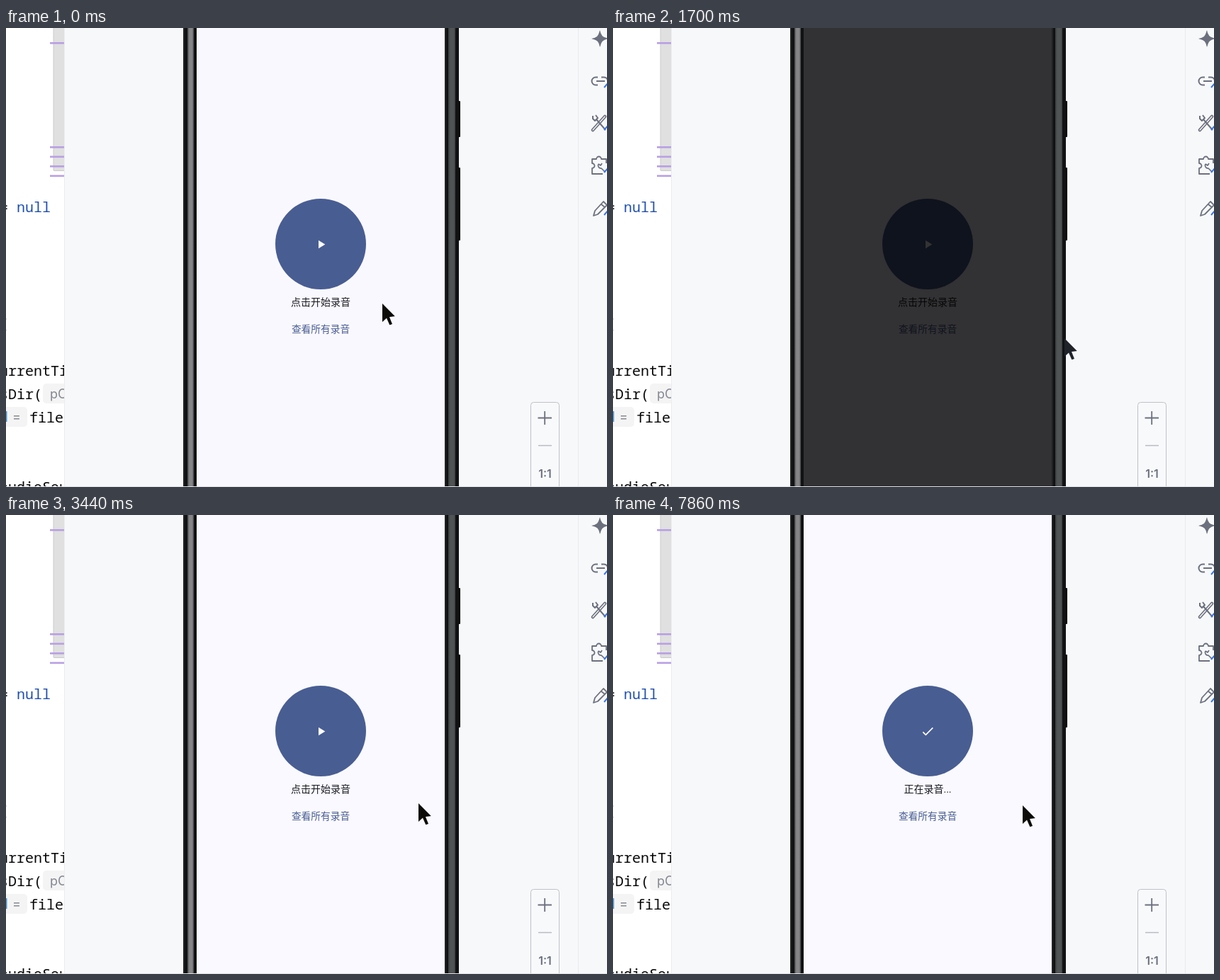
Write an HTML page with a canvas that moves like this. It is 848 by 648 pixels and loops after 8 s.

```html
<!DOCTYPE html>
<html lang="en">
<head>
<meta charset="utf-8">
<title>Recorder demo</title>
<style>
html, body { margin: 0; width: 100%; height: 100%; overflow: hidden; background: #f7f8fa; }
canvas { display: block; width: 848px; height: 648px; }
</style>
</head>
<body>
<canvas id="stage" width="848" height="648"></canvas>
<script>
const ctx = document.getElementById('stage').getContext('2d');
const LOOP = 8000;
const MONO = '20px "Noto Sans Mono", "DejaVu Sans Mono", monospace';
const ROBOTO = 'Roboto, "Noto Sans CJK SC", "Noto Sans CJK", sans-serif';
const INTER = 'Inter, sans-serif';
const BLUE = '#485d92', ICON = '#6c707e', PANEL = '#f7f8fa', INK = '#1a1b21';

// Scene changes in ms
const PRESS = 560, RELEASE = 1160, SCRIM = 1700, ASK = 1840, ASKED = 1980;
const GRANTED = 3440, RECORDING = 3920;

// Pointer: each move bends towards a point on its way to the goal
const REST = { x: 531, y: 389 };
const MOVES = [
  { from: 80, to: 560, via: [490, 355], goal: [459, 322] },
  { from: 600, to: 900, via: [580, 400], goal: [632, 431] },
  { from: 900, to: 1500, via: [636, 435], goal: [637, 438] },
  { from: 2600, to: 3020, via: [560, 375], goal: [468, 318] },
  { from: 3240, to: 3590, via: [590, 378], goal: [617, 481] },
  { from: 7400, to: 7860, via: [605, 470], goal: [578, 410] }
];

const clamp = v => Math.max(0, Math.min(1, v));
const smooth = v => v * v * (3 - 2 * v);
const bend = (a, b, c, k) => a * (1 - k) ** 2 + 2 * b * k * (1 - k) + c * k * k;

function tipAt(t) {
  let { x, y } = REST;
  for (const { from, to, via, goal } of MOVES) {
    if (t < from) break;
    const k = smooth(clamp((t - from) / (to - from)));
    x = bend(x, via[0], goal[0], k);
    y = bend(y, via[1], goal[1], k);
  }
  return [Math.round(x), Math.round(y)];
}

function box(x, y, w, h, color) {
  ctx.fillStyle = color;
  ctx.fillRect(x, y, w, h);
}

function round(x, y, w, h, r, fill, edge) {
  ctx.beginPath();
  ctx.roundRect(x, y, w, h, r);
  ctx.fillStyle = fill;
  ctx.fill();
  if (!edge) return;
  ctx.strokeStyle = edge;
  ctx.lineWidth = 1;
  ctx.stroke();
}

function disc(x, y, r, color) {
  ctx.fillStyle = color;
  ctx.beginPath();
  ctx.arc(x, y, r, 0, 7);
  ctx.fill();
}

function text(s, x, y, font, color, align = 'left') {
  ctx.font = font;
  ctx.fillStyle = color;
  ctx.textAlign = align;
  ctx.fillText(s, x, y);
}

function line(d, color, width, cap = 'butt') {
  ctx.strokeStyle = color;
  ctx.lineWidth = width;
  ctx.lineCap = cap;
  ctx.lineJoin = 'round';
  ctx.stroke(new Path2D(d));
}

function shape(d, color) {
  ctx.fillStyle = color;
  ctx.fill(new Path2D(d));
}

function clipped(x, y, w, h, paint) {
  ctx.save();
  ctx.beginPath();
  ctx.rect(x, y, w, h);
  ctx.clip();
  paint();
  ctx.restore();
}

function at(x, y, paint) {
  ctx.save();
  ctx.translate(x, y);
  paint();
  ctx.restore();
}

function hint(x, y, s) {
  round(x, y, 40, 28, 5, '#f4f4f5');
  text(s, x + 10, y + 20.5, '18px ' + INTER, '#858790');
}

function editor() {
  box(0, 0, 82, 647, '#fff');
  round(67, -5, 16, 206.5, 1, '#e0e0e0', '#cbcbcb');
  box(62, 20, 20, 2.6, '#b99fe4');
  for (let i = 0; i < 4; i++) box(62, 167 + i * 13.5, 20, 2.6, '#b99fe4');

  const code = (s, x, y, color = '#080808') => text(s, x, y, MONO, color);
  code('=', -9, 260);
  code('null', 15, 260, '#1f4fb0');
  code('{', -9, 424);
  code('urrentTi', -9, 491);
  code('sDir(', -9, 524);
  hint(52, 502, 'pO');
  hint(-10, 535, '');
  text('=', 9, 555, '18px ' + INTER, '#858790');
  box(0, 541, 1.5, 15, '#4a97d8');
  code('file', 33, 557);
  code('audioSou', -9, 655);
}

function toolbar() {
  box(807, 0, 1, 647, '#e9eaee');

  at(838, 15, () => {
    for (let i = 0; i < 4; i++) {
      shape('M0 -12Q1.500 -1.500 11 0L0 0L-3 -3Z', ICON);
      ctx.rotate(Math.PI / 2);
    }
  });

  at(838, 75, () => line('M-3 -5.500H-6A5.500 5.500 0 0 0 -6 5.500H-3M2 -5.500H6A5.500 5.500 0 0 1 11 0M-5 0H7', ICON, 2));

  at(837, 134, () => {
    line('M-9 10L8 -9', ICON, 4.5, 'round');
    line('M-9 10L8 -9', PANEL, 1.3, 'round');
    line('M-9 -10V-6L-6 -3L-2 -7L-5 -11M-4 -5L9 10', ICON, 2);
  });

  at(837, 194, () => {
    line('M5 12H-10V4A3.500 3.500 0 0 0 -10 -3V-9H-4A3.500 3.500 0 0 1 3 -9H10V-3', ICON, 1.8);
    line('M-1 -2A4 4 0 0 0 3 4L8 9M-1 -2L2 0L4 -3', ICON, 1.7);
  });

  at(838, 255, () => line('M-9 10L-7 3L5 -10L10 -5L-3 8ZM2 -6L7 -2', ICON, 1.8));

  for (const y of [80, 140, 200, 260]) line(`M844 ${y + 4}L850 ${y - 3}`, '#3574f0', 2);
}

function zoom() {
  round(740.5, 528.5, 40, 130, 4, '#f8f9fb', '#bfc1c7');
  line('M750.500 550.500H770M760.200 541V560', ICON, 1.8);
  line('M751 589.500H770', '#b9bbc2', 1.5);
  text('1:1', 760.5, 634.5, '600 16px ' + INTER, ICON, 'center');
}

// Dark rail with a lit metal strip
function rail(x, w, lit, litW, edge, core) {
  box(x, 0, w, 647, '#111213');
  box(x, 0, 2, 647, '#222325');
  const g = ctx.createLinearGradient(lit, 0, lit + litW, 0);
  g.addColorStop(0, edge);
  g.addColorStop(0.3, core);
  g.addColorStop(0.75, core);
  g.addColorStop(1, edge);
  box(lit, 0, litW, 647, g);
}

function phone() {
  rail(250, 19, 256, 9, '#444446', '#858587');
  rail(619, 20, 624, 10, '#3b3e3e', '#505454');
  round(638, 103, 3, 51, 1, '#0d0d0e');
  round(638, 197, 3, 103, 1, '#0d0d0e');
}

function app(t) {
  box(269, 0, 350, 647, t < GRANTED ? '#faf8ff' : '#f9f9ff');
  disc(444, 305, 64, BLUE);
  if (t >= PRESS && t < RELEASE) {
    const grow = smooth(clamp((t - PRESS + 80) / 320));
    const fade = clamp((RELEASE - t) / 240);
    disc(444, 305, 64 * grow, `rgba(255,255,255,${0.11 * fade})`);
  }
  const on = t >= RECORDING;
  if (on) line('M437.300 306.300L441.300 310.300L451.300 300.300', '#fff', 1.7);
  else shape('M441 299.700L450.300 305.500L441 311.300Z', '#fff');
  text(on ? '正在录音...' : '点击开始录音', 444, 392.3, '14px ' + ROBOTO, INK, 'center');
  text('查看所有录音', 444, 429.8, '500 13.7px ' + ROBOTO, BLUE, 'center');
}

function mic() {
  line('M0 -8V-1', BLUE, 7, 'round');
  line('M0 -8V-1', '#eeedf4', 2.5, 'round');
  line('M-7 -1A7 7 0 0 0 7 -1M0 6V11', BLUE, 2.3);
}

function dialog(t) {
  const k = 0.4 + 0.6 * clamp((t - ASK) / (ASKED - ASK));
  ctx.save();
  ctx.globalAlpha = k;
  ctx.translate(0, Math.round(12 * (1 - k)));
  round(292, 169, 304, 293, 27, '#eeedf4');
  at(444, 202, mic);

  const title = '17px ' + ROBOTO;
  text('Allow', 322, 245, title, INK);
  text('PuddleMurmurs', 431, 245, 'bold ' + title, INK, 'center');
  text('to record', 566, 245, title, INK, 'right');
  text('audio?', 444, 265, title, INK, 'center');

  ['While using the app', 'Only this time', 'Don’t allow'].forEach((label, i) => {
    const y = 292 + i * 51, top = i === 0 ? 11 : 3, low = i === 2 ? 11 : 3;
    round(312, y, 264, 47.7, [top, top, low, low], '#d9e2ff');
    text(label, 444, y + 28.8, '12px ' + ROBOTO, INK, 'center');
  });
  ctx.restore();
}

function pointer(t) {
  const idle = t >= 950 && t < 2640, pale = t >= 3510 && t < 7520;
  at(...tipAt(t), () => {
    shape('M0 0V26L6 20.500L10.300 30.300L14 29L10 19L17.800 18Z', idle ? '#20232a' : '#0c0b08');
    if (pale) shape('M2.300 5V21L6.300 17.500L11 28L12.500 27.300L8 17.300L14 16.800Z', '#dedede');
  });
}

function draw(t) {
  box(0, 0, 848, 648, PANEL);
  clipped(0, 0, 82, 647, editor);
  box(82, 0, 1, 647, '#ebecf0');
  toolbar();
  clipped(735, 520, 50, 127, zoom);
  phone();
  app(t);
  if (t >= SCRIM && t < GRANTED) {
    box(269, 0, 350, 647, 'rgba(0,0,0,.8)');
    if (t >= ASK) dialog(t);
  }
  box(0, 647, 848, 1, '#dfe0e3');
  pointer(t);
}

const start = performance.now();
function tick() {
  draw((performance.now() - start) % LOOP);
  requestAnimationFrame(tick);
}
tick();
</script>
</body>
</html>
```
